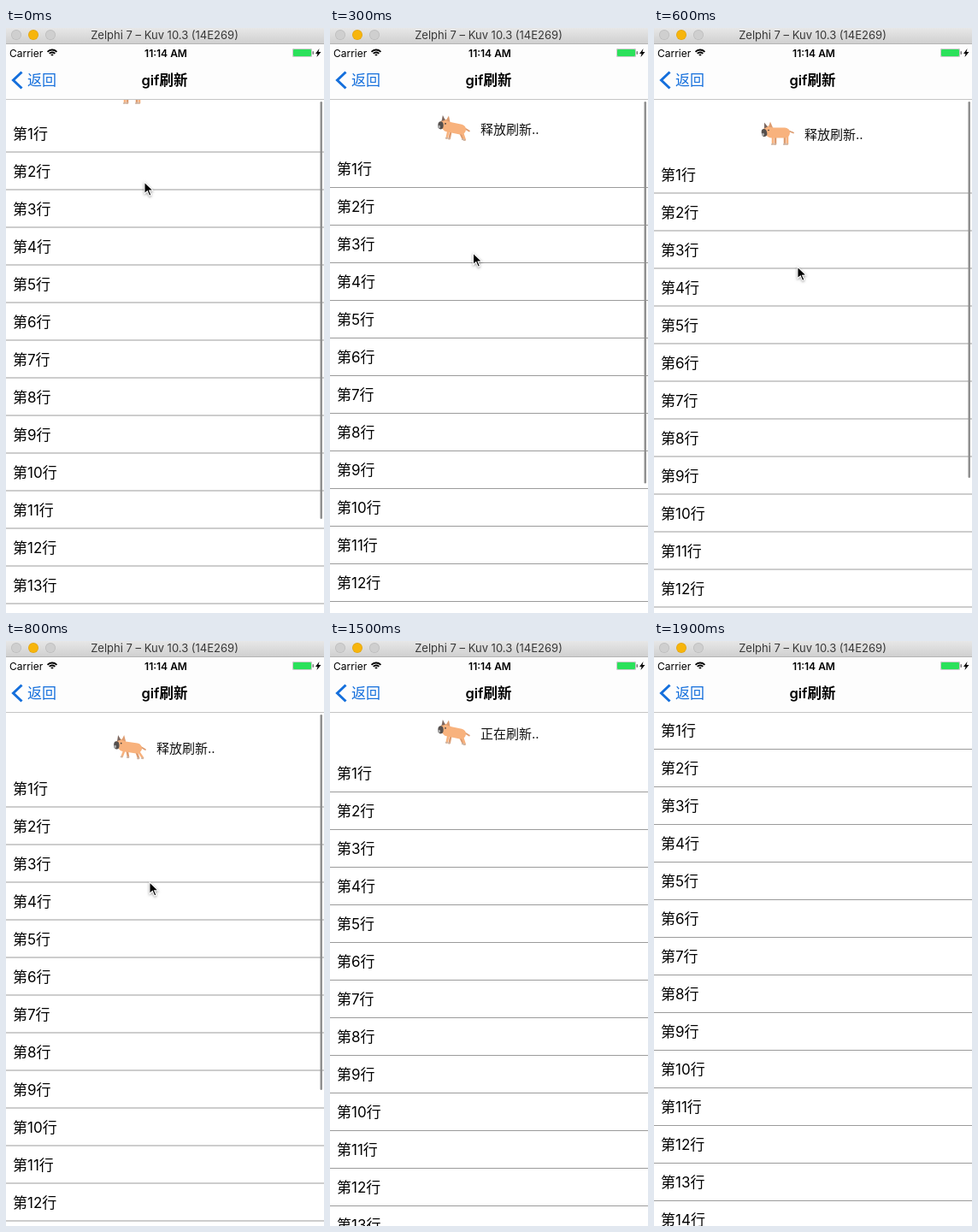
Animation, 372 px wide and 684 px high, one loop 2000 ms. Source, as an HTML page with a canvas:

```html
<!DOCTYPE html>
<html lang="zh-CN">
<head>
<meta charset="utf-8">
<style>
  html, body { margin: 0; width: 100%; height: 100%; overflow: hidden; background: #fff; }
  canvas { display: block; }
</style>
</head>
<body>
<canvas width="372" height="684"></canvas>
<script>
const canvas = document.querySelector('canvas');
const ctx = canvas.getContext('2d');
const WIDTH = 372, HEIGHT = 684, LOOP = 2000, STEP = 100;
const NAV_BOTTOM = 83, ROW = 44, HEADER = 50;
const RELEASE = 800, LOADED = 1500, SETTLE = 300;
const BLUE = '#146fdc';
const FAMILY = 'Inter, "Noto Sans CJK SC", "Noto Sans CJK", sans-serif';

const progress = (t, start) => Math.min(1, Math.max(0, (t - start) / SETTLE));
const ease = u => (1 - Math.cos(Math.PI * u)) / 2;
const mix = (a, b, u) => a + (b - a) * u;
const approach = (from, to, t, tau) => mix(to, from, Math.exp(-t / tau));

// The drag slows against the rubber band, springs to the header, then closes.
function pullAt(t) {
  const dragged = approach(18.5, 68, t, 165);
  const held = mix(dragged, HEADER, ease(progress(t, RELEASE)));
  const pull = mix(held, 0, ease(progress(t, LOADED)));
  return Math.round(pull * 2) / 2;
}

function pointerAt(t) {
  const sinceLeaving = Math.max(0, t - RELEASE - 100);
  return [approach(161.5, 167.5, t, 120) + 0.00133 * sinceLeaving ** 2, approach(180, 283, t, 183)];
}

function text(str, x, y, size, color = '#000', weight = 400, align = 'left') {
  ctx.font = `${weight} ${size}px ${FAMILY}`;
  ctx.textAlign = align;
  ctx.fillStyle = color;
  ctx.fillText(str, x, y);
}

function rect(x, y, w, h, color, radius = 0) {
  ctx.fillStyle = color;
  ctx.beginPath();
  ctx.roundRect(x, y, w, h, radius);
  ctx.fill();
}

function ellipse(x, y, rx, ry, color, angle = 0) {
  ctx.fillStyle = color;
  ctx.beginPath();
  ctx.ellipse(x, y, rx, ry, angle, 0, Math.PI * 2);
  ctx.fill();
}

function polygon(points, color) {
  ctx.fillStyle = color;
  ctx.beginPath();
  points.forEach(p => ctx.lineTo(...p));
  ctx.closePath();
  ctx.fill();
}

function stroke(points, width, color) {
  ctx.lineWidth = width;
  ctx.strokeStyle = color;
  ctx.beginPath();
  points.forEach(p => ctx.lineTo(...p));
  ctx.stroke();
}

function drawDog(x, y, phase) {
  const tilt = (1 - Math.cos(phase)) / 2, stretch = Math.abs(Math.sin(phase));
  const fur = '#f8b27d', shade = '#dd9c70';
  const leg = (hip, swing, color) => {
    const foot = [hip + swing, 12 - Math.abs(swing) / 2];
    stroke([[hip, 3], foot], 2.6, color);
    stroke([foot, [foot[0] - 1, foot[1] + 0.5]], 1.8, '#c9b5a8');
  };
  ctx.save();
  ctx.translate(x, y + tilt);
  ctx.rotate(0.2 * tilt);
  ctx.lineCap = 'round';
  leg(-3, 3 * stretch, shade);
  leg(8, 5 * tilt, shade);
  stroke([[13, -3], [18, -1]], 1.8, shade);
  rect(-14, -7, 28, 12, fur, 6);
  leg(-6, -2 * stretch, fur);
  leg(11, 4 * tilt + 3 * stretch, fur);
  ellipse(-11, -3, 6.5, 6, fur);
  polygon([[-16, -6], [-16, -13], [-12, -8]], '#7d6860');
  polygon([[-11, -8], [-9, -14], [-6, -7]], shade);
  ellipse(-16, -1, 3.2, 4.6, '#55504e', -0.2);
  ellipse(-17.5, 1, 1.5, 1.8, '#aaa');
  ellipse(-11, -4, 0.8, 0.8, '#333');
  ctx.restore();
}

function headerLabel(t, pull) {
  if (t > RELEASE && t <= LOADED) return '正在刷新..';
  return t <= RELEASE && pull > HEADER ? '释放刷新..' : '下拉刷新..';
}

function drawList(t, pull) {
  for (let i = 0; i < 15; i++) {
    const y = NAV_BOTTOM + pull + i * ROW;
    text(`第${i + 1}行`, 8, y + 28, 17);
    rect(0, y + 43, WIDTH, 1, '#9b9b9b');
  }
  if (pull > 0) {
    drawDog(145, 57 + pull, t / STEP * Math.PI / 3);
    text(headerLabel(t, pull), 176, 63.5 + pull, 15, '#111');
  }
  ctx.globalAlpha = 1 - progress(t, RELEASE);
  rect(367.5, 86, 2.5, 506.5 - pull, '#909090', 1.25);
  ctx.globalAlpha = 1;
}

function drawWindowBar() {
  const gradient = ctx.createLinearGradient(0, 0, 0, 18);
  gradient.addColorStop(0, '#e7e7e7');
  gradient.addColorStop(1, '#d0d0d0');
  rect(0, 0, WIDTH, 18, gradient);
  rect(0, 18, WIDTH, 1, '#b5b5b5');
  ['#cfcfcf', '#f7b50c', '#cfcfcf'].forEach((color, i) => {
    ellipse(12 + i * 20, 8, 6, 6, i === 1 ? '#e2a512' : '#bcbcbc');
    ellipse(12 + i * 20, 8, 5.2, 5.2, color);
  });
  text('Zelphi 7 – Kuv 10.3 (14E269)', 185.5, 13, 13, '#383838', 400, 'center');
}

function drawStatusBar() {
  text('Carrier', 4, 33.5, 12);
  ctx.lineCap = 'butt';
  ctx.strokeStyle = '#000';
  ctx.lineWidth = 1.8;
  for (const radius of [1.5, 4.5, 7.5]) {
    ctx.beginPath();
    ctx.arc(54, 33, radius, -Math.PI * 0.76, -Math.PI * 0.24);
    ctx.stroke();
  }
  text('11:14 AM', 187, 33.5, 12, '#000', 600, 'center');
  rect(335, 24, 23, 10, '#999', 2);
  rect(335.5, 24.5, 22, 9, '#fff', 1.5);
  rect(336, 25, 21, 8, '#2be15b', 1);
  rect(358.5, 27, 1.5, 4, '#777', 1);
  polygon([[366.5, 24], [362, 30], [364.5, 30], [363.5, 34], [368.5, 28], [365.5, 28]], '#000');
}

function drawNavBar() {
  rect(0, 19, WIDTH, 64, '#fdfdfd');
  rect(0, NAV_BOTTOM, WIDTH, 1, '#c5c5c5');
  drawStatusBar();
  stroke([[18.5, 51.5], [8.5, 61], [18.5, 70.5]], 3, BLUE);
  text('返回', 25, 67, 17, BLUE);
  text('gif刷新', 185.5, 67, 16.5, '#000', 600, 'center');
}

function drawPointer(x, y) {
  ctx.save();
  ctx.translate(x, y);
  ctx.shadowColor = 'rgba(0,0,0,.4)';
  ctx.shadowBlur = 3;
  ctx.shadowOffsetY = 1;
  polygon([[0, -1], [0, 15], [3.7, 11.7], [6, 17], [9, 15.7], [6.8, 10.7], [11.5, 10.5]], '#fff');
  ctx.shadowColor = 'transparent';
  polygon([[1, 1.5], [1, 12.5], [4, 9.8], [6.5, 15.6], [7.7, 15], [5.3, 9.6], [9.3, 9.5]], '#000');
  ctx.restore();
}

function draw(now) {
  const t = Math.floor(now % LOOP / STEP) * STEP;
  ctx.fillStyle = '#fff';
  ctx.fillRect(0, 0, WIDTH, HEIGHT);
  drawList(t, pullAt(t));
  drawWindowBar();
  drawNavBar();
  drawPointer(...pointerAt(t));
}

const start = performance.now();
function tick() {
  draw(performance.now() - start);
  requestAnimationFrame(tick);
}
tick();
</script>
</body>
</html>
```
